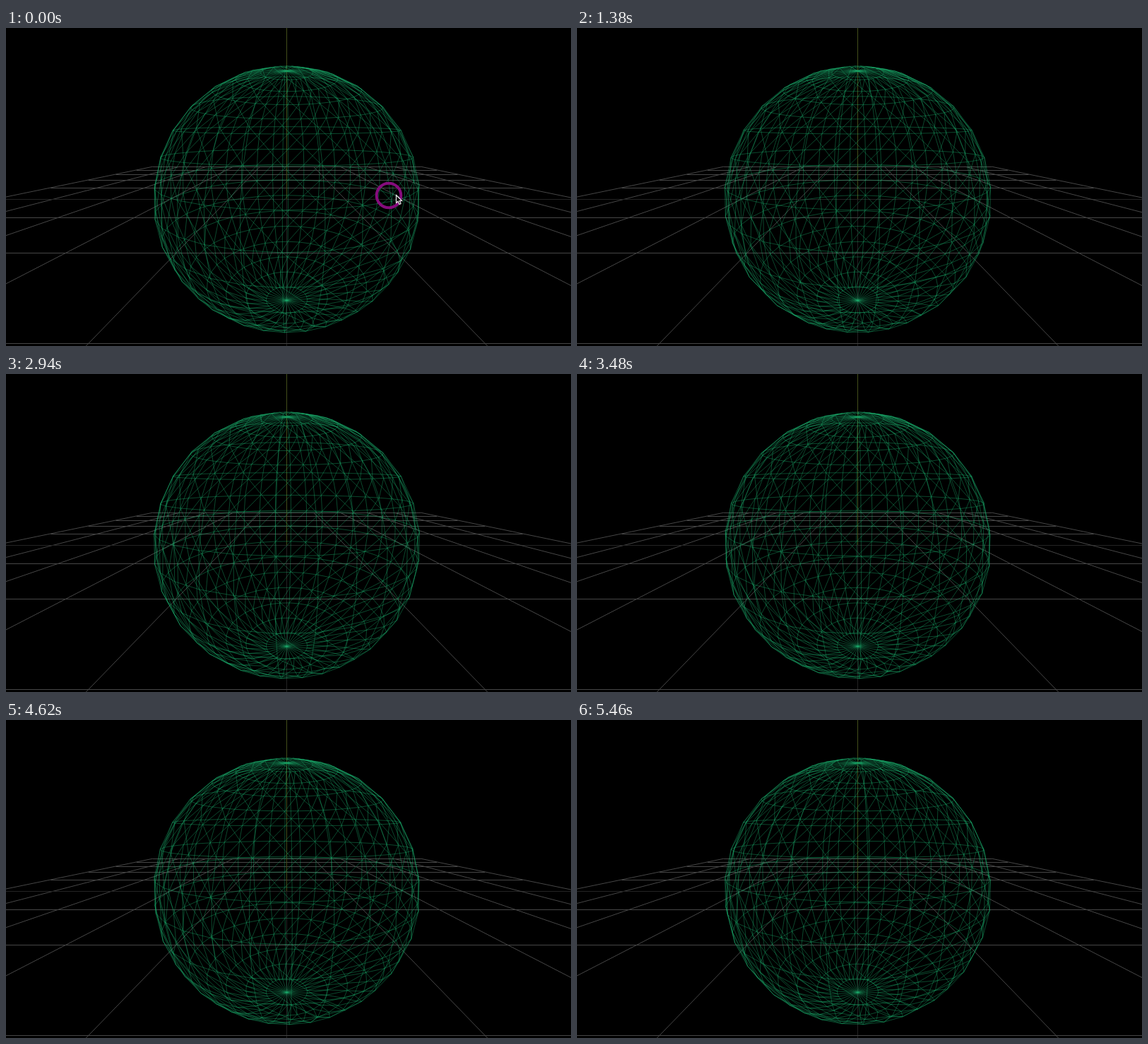
Animation of 800x450 px, one loop 5520 ms. Source, as an HTML page with a canvas:

```html
<!DOCTYPE html>
<html lang="en">
<head>
<meta charset="utf-8">
<title>Wireframe sphere</title>
<style>
  html, body { margin: 0; width: 800px; height: 450px; overflow: hidden; background: #000; }
  canvas { display: block; }
</style>
</head>
<body>
<canvas id="stage" width="800" height="450"></canvas>
<script>
const ctx = document.getElementById('stage').getContext('2d');
const LOOP = 5520, STEP = 60;
const CX = 397.5, CY = 242.2, FOCAL = 340.5;
const DIST = Math.hypot(1, 4), SIN = 1 / DIST, COS = 4 / DIST;
const RADIUS = 2, COLS = 32, ROWS = 16;
const SEG = 2 * Math.PI / COLS;
// Ticks on which the picture holds still
const HOLDS = [10, 12, 13, 14, 15, 40, 41, 47, 67];
// Slightly uneven spin: [step, turn in sphere segments]
const SPIN = [[0, -0.1], [18, 2.5], [30, 4.08], [50, 7.08], [62, 9.25], [74, 11], [82, 12.25]];
const arrow = new Path2D('M.5 .5V11.5L3 9.2L5 13.5L7 12.6L5.2 8.5H8.5Z');

// Camera at (0, 1, 4) looking at the origin
function project(x, y, z) {
  const depth = DIST - y * SIN - z * COS;
  return [CX + FOCAL * x / depth, CY - FOCAL * (y * COS - z * SIN) / depth];
}

function line(a, b) {
  ctx.beginPath();
  ctx.moveTo(...a);
  ctx.lineTo(...b);
  ctx.stroke();
}

function spinAt(step) {
  const i = SPIN.findIndex(([end]) => end >= step) || 1;
  const [s0, a] = SPIN[i - 1], [s1, b] = SPIN[i];
  return (a + (b - a) * (step - s0) / (s1 - s0)) * SEG;
}

function drawGrid() {
  ctx.lineWidth = 1;
  for (let i = -5; i <= 5; i++) {
    ctx.strokeStyle = i ? '#464646' : '#242424';
    line(project(i, 0, -5), project(i, 0, 4.1));
    if (i <= 3) {
      const a = project(-5, 0, i), b = project(5, 0, i);
      a[1] = b[1] = Math.round(a[1] - 0.1) + 0.5;
      line(a, b);
    }
  }
  ctx.strokeStyle = '#434e1a';
  line([CX, 0], [CX, CY]);
}

function drawSphere(spin) {
  const vertex = (col, row) => {
    const lat = row * Math.PI / ROWS, lon = col * SEG + spin;
    const r = RADIUS * Math.sin(lat);
    return project(r * Math.sin(lon), RADIUS * Math.cos(lat), r * Math.cos(lon));
  };
  ctx.strokeStyle = 'rgba(28, 176, 110, 0.52)';
  ctx.lineWidth = 0.8;
  for (let row = 0; row < ROWS; row++) {
    for (let col = 0; col < COLS; col++) {
      const p = vertex(col, row);
      line(p, vertex(col, row + 1));
      if (row) line(p, vertex(col + 1, row));
      if (row && row < ROWS - 1) line(p, vertex(col + 1, row + 1));
    }
  }
}

function drawPointer(t) {
  if (t < 300) {
    ctx.globalAlpha = 1 - t / 300;
    ctx.strokeStyle = '#850c7c';
    ctx.lineWidth = 4;
    ctx.beginPath();
    ctx.arc(542, 237, 17.3, 0, 2 * Math.PI);
    ctx.stroke();
    ctx.globalAlpha = 1;
  }
  if (t >= 660) return;
  ctx.save();
  ctx.translate(552 + 235 * (t / 600) ** 1.3, 236);
  ctx.fillStyle = '#000';
  ctx.strokeStyle = '#eee';
  ctx.lineWidth = 1.2;
  ctx.fill(arrow);
  ctx.stroke(arrow);
  ctx.restore();
}

function frame() {
  const tick = Math.floor(performance.now() % LOOP / STEP);
  const step = tick - HOLDS.filter(h => h <= tick).length;
  ctx.fillStyle = '#000';
  ctx.fillRect(0, 0, 800, 450);
  drawGrid();
  drawSphere(spinAt(step));
  drawPointer(tick * STEP);
  requestAnimationFrame(frame);
}
frame();
</script>
</body>
</html>
```
